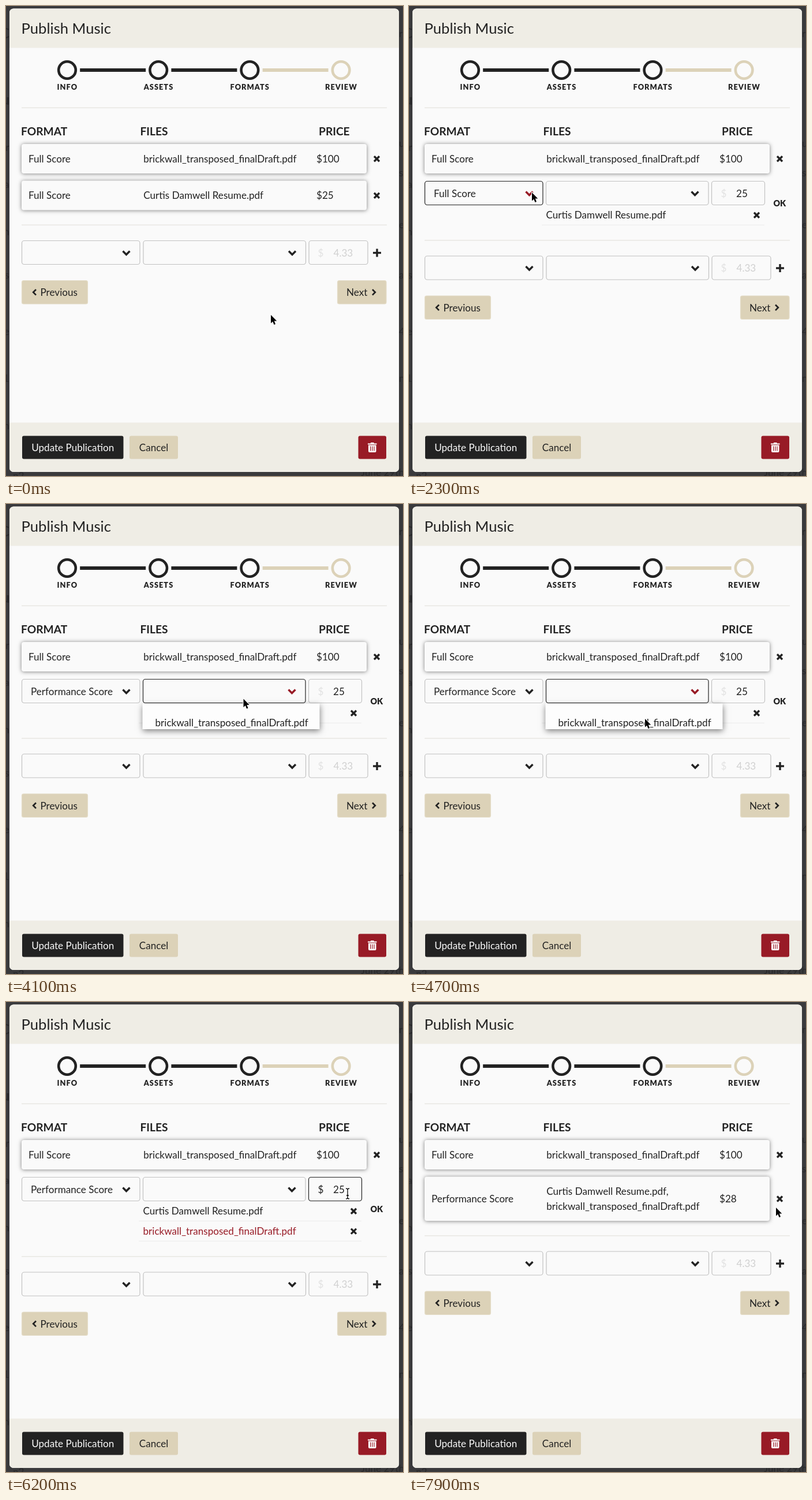
An HTML page with a canvas that plays this animation: 688 by 814 pixels, repeating every 8 s.

```html
<!DOCTYPE html>
<html lang="en">
<head>
<meta charset="utf-8">
<title>Publish Music</title>
<style>
html, body { margin: 0; width: 100%; height: 100%; overflow: hidden; background: #3a3a3c; }
canvas { display: block; width: 688px; height: 814px; }
</style>
</head>
<body>
<canvas id="stage" width="688" height="814"></canvas>
<script>
const g = document.getElementById('stage').getContext('2d');
const INK = '#222', TAN = '#dcd2b8', RED = '#981b26', CREAM = '#efede5', PAPER = '#fafafa';
const BODY = 17.1;
const RESUME = 'Curtis Damwell Resume.pdf', DRAFT = 'brickwall_transposed_finalDraft.pdf';
const FORMATS = ['', 'Full Score', 'Performance Score', 'Study Score', 'Vocal Score', 'Parts', 'Lead Sheet', 'Other'];

// Pointer stops: time, x, y
const STOPS = [
  [0, 459, 535], [800, 243, 337], [1200, 243, 337], [1300, 236, 331], [1900, 236, 331],
  [2300, 213, 323], [2500, 213, 323], [2800, 170, 318], [2900, 170, 318], [3200, 252, 354],
  [3400, 412, 331], [3900, 412, 331], [4700, 409, 372], [4900, 409, 372], [5600, 592, 332],
  [7000, 592, 332], [7400, 643, 361], [7800, 643, 361], [7900, 636, 356], [8000, 636, 356]
];
const ARROW = new Path2D('M0 0V14.5L3.3 11.5L5.5 17L8 16L5.8 10.6H10.3Z');
const HAND = new Path2D('M-2 1.5C-2-.8 1.5-.8 1.5 1.5V7C2 5.3 4.5 5.6 4.8 7.6C5.6 6.2 7.6 6.8 7.8 8.6C8.8 7.6 10 8.4 10 10V14Q9 16 8.6 18.5H-.4Q-2 15 -4.6 11.5C-6.6 8.6 -4 7.6 -2 10.2Z');
const CREASES = new Path2D('M1.5 7V10M4.8 7.6V10.4M7.8 8.6V11M2 13V16M4.5 13V16M7 13V16');
const BEAM = new Path2D('M-3-9Q0-9 0-7Q0-9 3-9M0-7V7M-3 9Q0 9 0 7Q0 9 3 9M-2 3H2');

function text(s, x, y, { size = BODY, weight = 400, color = INK, align = 'left', gap = 0 } = {}) {
  g.font = `${weight} ${size}px Lato, sans-serif`;
  g.letterSpacing = gap + 'px';
  g.textAlign = align;
  g.fillStyle = color;
  g.fillText(s, x, y);
}

function box(x, y, w, h, { r = 4, fill, border, blur = 0, drop = 0 } = {}) {
  g.beginPath();
  g.roundRect(x, y, w, h, r);
  if (fill) {
    g.save();
    if (blur) {
      g.shadowColor = 'rgba(0,0,0,.5)';
      g.shadowBlur = blur;
      g.shadowOffsetY = drop;
    }
    g.fillStyle = fill;
    g.fill();
    g.restore();
  }
  if (border) {
    g.strokeStyle = border;
    g.lineWidth = 1.2;
    g.stroke();
  }
}

function line(points, width, color = INK) {
  g.beginPath();
  points.forEach(([x, y]) => g.lineTo(x, y));
  g.strokeStyle = color;
  g.lineWidth = width;
  g.stroke();
}

const rule = (x, y, w, h, color) => { g.fillStyle = color; g.fillRect(x, y, w, h); };
const chevron = (x, y, color) => line([[x - 6, y - 3], [x, y + 3], [x + 6, y - 3]], 3.4, color);

function cross(x, y) {
  line([[x - 4.5, y - 4.5], [x + 4.5, y + 4.5]], 3.4);
  line([[x - 4.5, y + 4.5], [x + 4.5, y - 4.5]], 3.4);
}

function select(x, y, w, { value = '', focus, hot } = {}) {
  box(x + .5, y + .5, w - 1, 41, { border: focus ? INK : '#c2c2c2' });
  text(value, x + 16, y + 27.5);
  chevron(x + w - 24, y + 21.5, focus || hot ? RED : INK);
}

function row(y, h, format, files, price) {
  const mid = y + h / 2 + .3;
  box(27, y, 598, h, { fill: PAPER, blur: 7, drop: .5 });
  text(format, 39, mid + 6);
  files.forEach((f, i) => text(f, 238.3, mid + 6 + (i - (files.length - 1) / 2) * 25.5));
  text(price, 538, mid + 6);
  cross(642.5, mid);
}

function menu(x, y, w, h, items) {
  box(x, y, w, h, { r: 0, fill: '#fdfdfd', blur: 10, drop: 3 });
  items.forEach((s, i) => text(s, x + 22, y + 17 + 22 * i));
}

function backdrop() {
  rule(0, 0, 688, 814, '#3a3a3c');
  const dim = { color: '#28282a' };
  text('C', 6, 56, { ...dim, size: 25, align: 'right' });
  text('u', 6, 171, { ...dim, size: 25, weight: 700, align: 'right' });
  [['r', 251], ['a', 315], ['n', 397], ['s', 472], ['e', 570], ['1', 651], ['n', 733]]
    .forEach(([s, y]) => text(s, 5.5, y, { ...dim, align: 'right' }));
  [['r', 54], ['u', 244], ['s', 295], ['er', 385], ['a', 472], ['4', 570], ['n', 651]]
    .forEach(([s, y]) => text(s, 681, y, dim));
  text('June 29th', 615, 814, dim);
  text('n2', 12, 820, dim);
}

function frame() {
  box(6, 4.5, 675, 802.5, { r: 7, fill: PAPER });
  box(6, 4.5, 675, 68, { r: [7, 7, 0, 0], fill: CREAM });
  box(6, 721.5, 675, 85.5, { r: [0, 0, 7, 7], fill: CREAM });
  text('Publish Music', 26.5, 48, { size: 25.65 });

  ['INFO', 'ASSETS', 'FORMATS', 'REVIEW'].forEach((s, i) => {
    const x = 106 + 158.2 * i, color = i < 3 ? INK : TAN;
    if (i) rule(x - 136, 108, 114, 6, color);
    g.beginPath();
    g.arc(x, 111, 14.8, 0, 7);
    g.strokeStyle = color;
    g.lineWidth = 4.6;
    g.stroke();
    text(s, x + .3, 145, { size: 12.8, weight: 900, align: 'center', gap: 1 });
  });
  rule(27, 175.5, 633, 1.6, '#e9e8e4');
  [['FORMAT', 26], ['FILES', 232.5], ['PRICE', 542]]
    .forEach(([s, x]) => text(s, x, 223.6, { size: 19.2, weight: 700 }));

  box(28, 744.5, 175.5, 40, { r: 3, fill: INK });
  text('Update Publication', 115.7, 771, { color: '#fafafa', align: 'center' });
  box(214, 744.5, 84, 40, { r: 3, fill: TAN });
  text('Cancel', 256, 771, { align: 'center' });
  box(610.5, 744.5, 48.5, 40, { r: 3, fill: RED });
  rule(627, 757.5, 15.5, 2, '#fff');
  rule(632, 756, 5.5, 2, '#fff');
  box(628, 760.5, 13.5, 12.5, { r: [0, 0, 2, 2], fill: '#fff' });
  [631, 634.2, 637.4].forEach(x => rule(x, 762.5, 1.2, 8, RED));
}

function addRow(dy, hot) {
  const y = 406 + dy;
  rule(27, y - 27.5, 633, 1.6, '#e9e8e4');
  select(27, y, 205.5);
  select(237.5, y, 282.5, { hot });
  box(525, y + .5, 102, 41, { border: '#c2c2c2' });
  text('$', 540.5, y + 27.5, { color: '#e2e2e2' });
  text('4.33', 567.5, y + 27.5, { color: '#d0d0d0' });
  line([[636, y + 21.5], [650, y + 21.5]], 3.4);
  line([[643, y + 14.5], [643, y + 28.5]], 3.4);

  const by = y + 69.5;
  box(27.5, by, 114, 40.5, { r: 3, fill: TAN, border: '#e4dcc7' });
  line([[52, by + 15.5], [47.2, by + 20.3], [52, by + 25.1]], 2.7);
  text('Previous', 59.5, by + 26.5);
  box(574.5, by, 84.5, 40.5, { r: 3, fill: TAN, border: '#e4dcc7' });
  text('Next', 590, by + 26.5);
  line([[635, by + 15.5], [639.8, by + 20.3], [635, by + 25.1]], 2.7);
}

function editor(t) {
  const two = t >= 4900, pricing = t >= 5700;
  const price = t < 6500 ? '25' : t < 6800 ? '2' : '28';
  select(27, 303, 205.5, { value: t < 3000 ? 'Full Score' : 'Performance Score', focus: t >= 2200 && t < 3500 });
  select(237, 303, 282.5, { focus: t >= 3500 && !pricing });
  box(524.5, 303.5, 92, 41, { border: pricing ? INK : '#c2c2c2' });
  text('$', 540.5, 330.5, { color: pricing ? INK : '#e2e2e2' });
  text(price, 567, 330.5);
  if (pricing && (t < 6200 || t >= 6500)) rule(567.5 + g.measureText(price).width, 315, 1, 19, INK);

  [RESUME, DRAFT].slice(0, two ? 2 : 1).forEach((f, i) => {
    const y = 362.3 + 34.8 * i;
    text(f, 237.5, y + 6, { color: i ? RED : INK });
    cross(602.5, y);
    rule(230, y + 16.5, 386, 1, '#ececec');
  });
  text('OK', 642.3, two ? 364.2 : 347, { size: 14.3, weight: 900, align: 'center' });
}

function pointerAt(t) {
  const i = STOPS.findIndex(s => s[0] > t);
  const [t0, x0, y0] = STOPS[i - 1], [t1, x1, y1] = STOPS[i];
  const u = (t - t0) / (t1 - t0), e = u * u * (3 - 2 * u);
  return [x0 + (x1 - x0) * e, y0 + (y1 - y0) * e];
}

function pointer(t, x, y, editing) {
  if (t >= 6500 && t < 7000) return;
  const overRow = t < 1800 && y > 303 && y < 353;
  const overOk = x > 628 && t < 7900;
  const overPrice = editing && x > 524 && x < 617 && y > 303 && y < 345;
  g.save();
  g.translate(x, y);
  g.lineJoin = 'round';
  const stroke = (path, color, width) => {
    g.strokeStyle = color;
    g.lineWidth = width;
    g.stroke(path);
  };
  if (overPrice) {
    stroke(BEAM, '#fff', 3);
    stroke(BEAM, '#000', 1.3);
  } else if (overRow || overOk) {
    g.fillStyle = '#fff';
    g.fill(HAND);
    stroke(HAND, '#000', 1.3);
    stroke(CREASES, '#000', 1);
  } else {
    stroke(ARROW, '#fff', 2);
    g.fillStyle = '#000';
    g.fill(ARROW);
  }
  g.restore();
}

function draw(now) {
  const t = Math.floor(now % 8000 / 100) * 100;
  const editing = t >= 1800 && t < 7500;
  const [x, y] = pointerAt(t);
  backdrop();
  frame();
  row(239, 51, 'Full Score', [DRAFT], '$100');
  if (editing) editor(t);
  else if (t < 1800) row(302.5, 51, 'Full Score', [RESUME], '$25');
  else row(302.5, 76.5, 'Performance Score', [RESUME + ',', DRAFT], '$28');
  const dy = t < 1800 ? 0 : !editing ? 25.5 : t < 4900 ? 26.5 : 61.5;
  addRow(dy, t < 1800 && y > 406 && y < 448);
  if (t >= 2400 && t < 3000) menu(27, 259, 206, 180, FORMATS);
  if (t >= 3600 && t < 4900) menu(236.5, 345.5, 307, 44.5, ['', DRAFT]);
  pointer(t, x, y, editing);
  requestAnimationFrame(draw);
}
requestAnimationFrame(draw);
</script>
</body>
</html>
```
